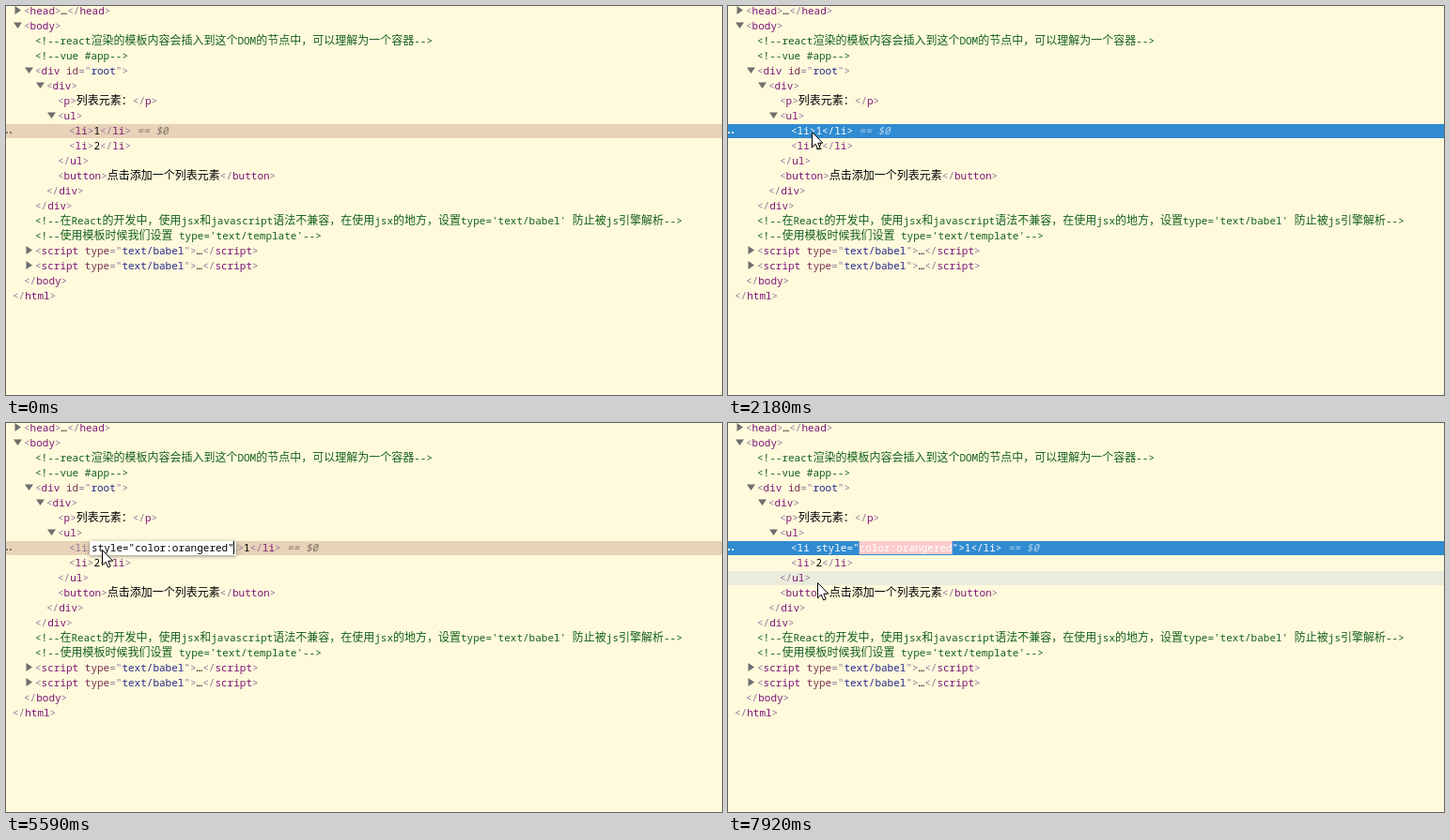
These frames come from a looping animation (762x415 px, 7990 ms). An HTML page with a canvas:

```html
<!DOCTYPE html>
<html lang="zh-CN">
<head>
<meta charset="utf-8">
<style>
html, body { margin: 0; overflow: hidden; background: #fffadc; }
canvas { display: block; }
</style>
</head>
<body>
<canvas width="762" height="415"></canvas>
<script>
const canvas = document.querySelector('canvas');
const ctx = canvas.getContext('2d');
const LOOP = 7990, PITCH = 16, BAR = 15, CHAR = 6.6, INDENT = 12;
const LATIN = '500 11px "Noto Sans Mono", monospace';
const CJK = '500 12px "Noto Sans CJK SC", "Noto Sans CJK", sans-serif';
const PAPER = '#fffadc', BLUE = '#308bd0', SELECTION = '#4a86d8', TEXT = '#000', COMMENT = '#14601c';
const BRACKET = '#98749a', TAG = '#7c1478', ATTR = '#7a3050', VALUE = '#28288c';
const CLICK = 1080, EDIT_TAG = 2870, DESELECT = 4040, EDIT_ATTR = 4500, PASTE = 5590, COMMIT = 6830;
const BLINK = 545, FLASH = 1120;
const STYLE = 'style="color:orangered"';

const source = `
<head>…</head>
<body>
<!--react渲染的模板内容会插入到这个DOM的节点中，可以理解为一个容器-->
<!--vue #app-->
<div id="root">
<div>
<p>列表元素：</p>
<ul>
<li>1</li>
<li>2</li>
</ul>
<button>点击添加一个列表元素</button>
</div>
</div>
<!--在React的开发中，使用jsx和javascript语法不兼容，在使用jsx的地方，设置type='text/babel' 防止被js引擎解析-->
<!--使用模板时候我们设置 type='text/template'-->
<script type="text/babel">…<\/script>
<script type="text/babel">…<\/script>
</body>
</html>`.trim().split('\n');

// Opening tags indent the lines below them, closing tags end the indent.
let depth = 1;
const lines = source.map((code, row) => {
  const opens = /^<\w[^>]*>$/.test(code);
  if (code.startsWith('</')) depth--;
  const line = { code, opens, folded: code.includes('…'), x: 7 + depth * INDENT, y: row * PITCH + 9 };
  if (opens) depth++;
  return line;
});
const selected = lines.find(line => line.code === '<li>1</li>');
const barTop = line => line.y - 11;

// Pointer moves: from its last place to x, y between two times.
const moves = [
  { from: 70, to: 390, x: 176, y: 182 },
  { from: 390, to: 860, x: 93, y: 138 },
  { from: 860, to: 1160, x: 89, y: 134 },
  { from: 2250, to: 2550, x: 74, y: 135 },
  { from: 2950, to: 3340, x: 102, y: 135 },
  { from: 7290, to: 7530, x: 102, y: 126 },
  { from: 7760, to: 7920, x: 95, y: 170 }
];
const arrow = new Path2D('M.5 .5V16.8L4.2 13.2 6.7 18.9 9.2 17.8 6.8 12.2H11.8Z');

const lerp = (a, b, p) => Math.round(a + (b - a) * p);
const progress = (t, from, to) => Math.max(0, Math.min(1, (t - from) / (to - from)));

function pointerAt(t) {
  let x = 215, y = 374;
  for (const move of moves) {
    const p = progress(t, move.from, move.to);
    x = lerp(x, move.x, p);
    y = lerp(y, move.y, p);
  }
  return { x, y };
}

function rect(x, y, w, h, color) {
  ctx.fillStyle = color;
  ctx.fillRect(x, y, w, h);
}

// Draws mixed Latin and Chinese text, returns the x where it ends.
function write(text, x, y, color, style = '') {
  ctx.fillStyle = color;
  for (const run of text.split(/([\u3000-\uffef]+)/)) {
    ctx.font = style + (/[\u3000-\uffef]/.test(run) ? CJK : LATIN);
    ctx.fillText(run, x, y);
    x += ctx.measureText(run).width;
  }
  return x;
}

// Draws one line of highlighted HTML, or all in one colour if solid is set.
function markup(code, x, y, solid) {
  if (code.startsWith('<!--')) return write(code, x, y, COMMENT);
  for (const part of code.split(/(<[^>]*>)/)) {
    const tag = part.match(/^(<\/?)(\w+)(?:( \w+)(=")(.*)("))?(>)$/);
    const pieces = tag ? tag.slice(1) : [part];
    const colors = tag ? [BRACKET, TAG, ATTR, BRACKET, VALUE, BRACKET, BRACKET] : [TEXT];
    pieces.forEach((piece, i) => {
      if (piece) x = write(piece, x, y, solid || colors[i]);
    });
  }
  return x;
}

function triangle(x, y, open) {
  ctx.save();
  ctx.translate(x - 6.5, y - 4.5);
  if (open) ctx.rotate(Math.PI / 2);
  ctx.fillStyle = '#6e6e6e';
  ctx.fill(new Path2D('M-3 -4.5L3.5 0-3 4.5Z'));
  ctx.restore();
}

function editBox(x, right, top) {
  ctx.save();
  ctx.shadowColor = 'rgba(0,0,0,.45)';
  ctx.shadowBlur = 4;
  ctx.shadowOffsetY = 1;
  rect(x, top, right - x, BAR, '#fff');
  ctx.restore();
}

function selectedLine(t) {
  const { code, y } = selected, top = barTop(selected);
  const focused = t >= CLICK && t < EDIT_TAG || t >= COMMIT;
  const solid = focused && '#fff';
  const mark = (x, chars, color) => rect(x, top, chars * CHAR, BAR - 1, color);
  const caret = x => rect(x, top, 1, BAR - 1, TEXT);
  rect(0, top, canvas.width, BAR, focused ? BLUE : '#e8d2b8');
  for (const x of [0, 4]) rect(x, top + 8, 2, 2, focused ? '#fff' : '#80766c');

  let x = selected.x;
  const name = x + CHAR;
  if (t >= COMMIT) {
    const p = 1 - (1 - progress(t, COMMIT, COMMIT + FLASH)) ** 3;
    const shade = lerp(50, 203, p);
    mark(x + 11 * CHAR, 15, `rgb(${lerp(170, 252, p)},${shade},${shade})`);
    x = markup(code.replace('<li', '<li ' + STYLE), x, y, solid);
  } else if (t >= EDIT_ATTR) {
    const text = t >= PASTE ? STYLE : ' ';
    const left = x + 24, end = left + text.length * CHAR;
    write('<li', x, y, BRACKET);
    x = write('>', end + 3.6, y, BRACKET);
    x = markup('1</li>', x, y);
    editBox(left - 2, end + 2, top);
    if (t < PASTE) mark(left, 1, SELECTION);
    else if (Math.floor((t - PASTE) / BLINK) % 2 === 0) caret(Math.floor(end));
    write(text, left, y, TEXT);
  } else {
    x = markup(code, x, y, solid);
    if (t >= EDIT_TAG) {
      const marked = t < DESELECT;
      editBox(name - 2, name + 2 * CHAR + 2, top);
      if (marked) mark(name, 2, SELECTION);
      else caret(Math.round(name + 2 * CHAR));
      write('li', name, y, marked ? '#fff' : TEXT);
    }
  }
  write('== $0', x + CHAR, y, focused ? '#b4d4ec' : '#7c7064', 'italic ');
}

function draw(t) {
  const { x: px, y: py } = pointerAt(t);
  rect(0, 0, canvas.width, canvas.height, PAPER);
  for (const line of lines) {
    const { code, opens, folded, x, y } = line, top = barTop(line);
    if (line === selected) {
      selectedLine(t);
      continue;
    }
    if (py >= top && py < top + PITCH) rect(0, top, canvas.width, BAR, '#eaecdc');
    if (opens || folded) triangle(x, y, opens);
    markup(code, x, y);
  }
  if (t < moves[0].from) return;
  ctx.save();
  ctx.translate(px, py);
  ctx.fillStyle = '#fff';
  ctx.fill(arrow);
  ctx.strokeStyle = '#000';
  ctx.stroke(arrow);
  ctx.restore();
}

const start = performance.now();
function tick() {
  draw((performance.now() - start) % LOOP);
  requestAnimationFrame(tick);
}
tick();
</script>
</body>
</html>
```
